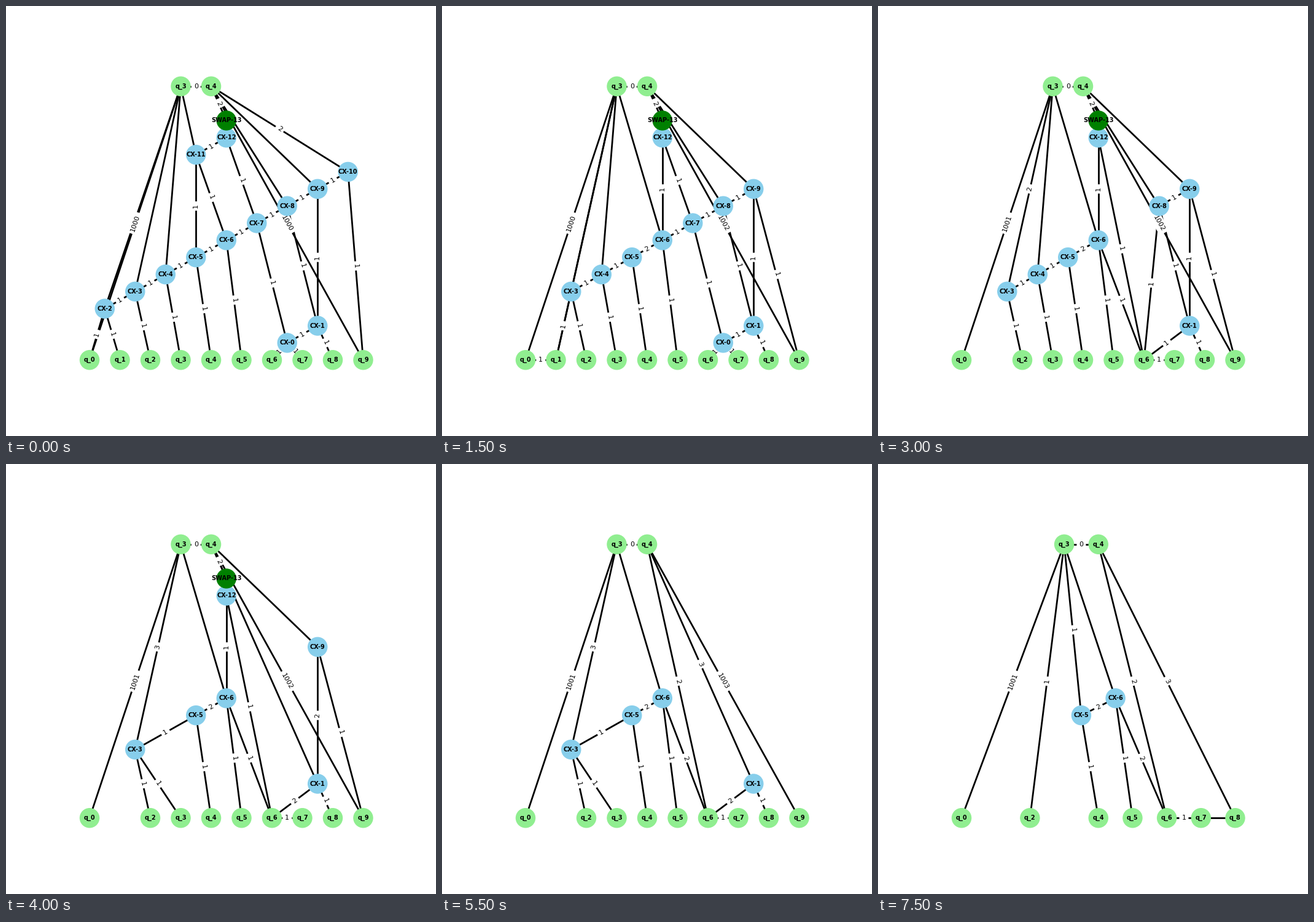
A matplotlib script that plays this animation: 700x700 px, repeating every 8 s.

```python
import numpy as np
import matplotlib.pyplot as plt
from matplotlib.animation import FuncAnimation
from matplotlib.collections import LineCollection

SIZE = 700
LEFT, BOTTOM, SPAN = 136.03, 123.77, 445.45
LAYERS = 16

# Node key -> (column, layer): i* inputs, c* two-qubit gates, s a swap, o* outputs
POS = {f"i{k}": (k, 0) for k in range(10)}
GATE_COLS = [6.5, 7.5, 0.5, 1.5, 2.5, 3.5, 4.5, 5.5, 6.5, 7.5, 8.5, 3.5, 4.5]
POS.update({f"c{k}": (col, k + 1) for k, col in enumerate(GATE_COLS)})
POS.update(s13=(4.5, 14), o3=(3, LAYERS), o4=(4, LAYERS))
ORDER = list(POS)

PREFIX = {"i": "q_", "o": "q_", "c": "CX-", "s": "SWAP-"}
COLOR = {"i": "lightgreen", "o": "lightgreen", "c": "skyblue", "s": "green"}

UNIT_EDGES = """c2-i0 c2-i1 c3-i2 c4-i3 c5-i4 c6-i5 c0-i6 c0-i7 c1-i8 c10-i9
c0-c1 c0-c7 c1-c8 c1-c9 c2-c3 c3-c4 c4-c5 c5-c6 c6-c7 c7-c8 c8-c9 c9-c10
c5-c11 c6-c11 c7-c12 c11-c12 c12-s13"""
PLAIN_EDGES = "c2-o3 c3-o3 c4-o3 c11-o3 c8-o4 c9-o4"
HEAVY_EDGES = {"i0-o3": 1000, "i9-o4": 1000, "c10-o4": 2, "s13-o4": 2, "o3-o4": 0}

# Each step folds the first node into the second
MERGES = """c10>i9 c2>i1 c11>c6 c7>c0 i1>o3 c0>i6 c8>c1 c4>c3 c12>i6
s13>i6 c9>o4 c3>o3 i3>o3 c1>i8 i9>o4"""


def key(a, b):
    return tuple(sorted((a, b), key=ORDER.index))


def first_graph():
    edges = {key(*e.split("-")): 1 for e in UNIT_EDGES.split()}
    edges.update({key(*e.split("-")): None for e in PLAIN_EDGES.split()})
    edges.update({key(*e.split("-")): w for e, w in HEAVY_EDGES.items()})
    return list(ORDER), edges


def contract(graph, gone, keep):
    """Fold one node into another, adding up weights (unlabelled counts as 1)."""
    nodes, edges = graph
    out = {e: w for e, w in edges.items() if gone not in e}
    for (a, b), w in edges.items():
        if gone not in (a, b) or keep in (a, b):
            continue
        e = key(keep, b if a == gone else a)
        if e in out:
            old = 1 if out[e] is None else out[e]
            out[e] = old + (1 if w is None else w)
        else:
            out[e] = w
    return [n for n in nodes if n != gone], out


states = [first_graph()]
for step in MERGES.split():
    states.append(contract(states[-1], *step.split(">")))

fig = plt.figure(figsize=(7, 7), dpi=100, facecolor="white")
ax = fig.add_axes([0, 0, 1, 1])


def place(nodes):
    width = max(POS[n][0] for n in nodes)
    return {n: (LEFT + SPAN * POS[n][0] / width,
                BOTTOM + SPAN * POS[n][1] / LAYERS) for n in nodes}


def edge_label(p, q, text):
    (x1, y1), (x2, y2) = p, q
    angle = np.degrees(np.arctan2(y2 - y1, x2 - x1))
    if angle > 90.01:
        angle -= 180
    elif angle < -89.99:
        angle += 180
    ax.text((x1 + x2) / 2, (y1 + y2) / 2, text, size=8, rotation=angle,
            ha="center", va="center", zorder=1,
            bbox=dict(boxstyle="round", ec="white", fc="white"))


def draw(i):
    ax.clear()
    ax.set(xlim=(0, SIZE), ylim=(0, SIZE))
    ax.axis("off")
    nodes, edges = states[i]
    pos = place(nodes)

    ax.add_collection(LineCollection([(pos[a], pos[b]) for a, b in edges],
                                     colors="black", linewidths=2, zorder=1),
                      autolim=False)
    for (a, b), w in edges.items():
        if w is not None:
            edge_label(pos[a], pos[b], str(w))

    xs, ys = zip(*pos.values())
    ax.scatter(xs, ys, s=500, c=[COLOR[n[0]] for n in nodes], zorder=2)
    for n, (x, y) in pos.items():
        ax.text(x, y, PREFIX[n[0]] + n[1:], size=7, weight="bold",
                ha="center", va="center", zorder=3)
    return []


anim = FuncAnimation(fig, draw, frames=len(states), init_func=lambda: [],
                     interval=500, repeat=True, repeat_delay=0)
plt.show()
```
